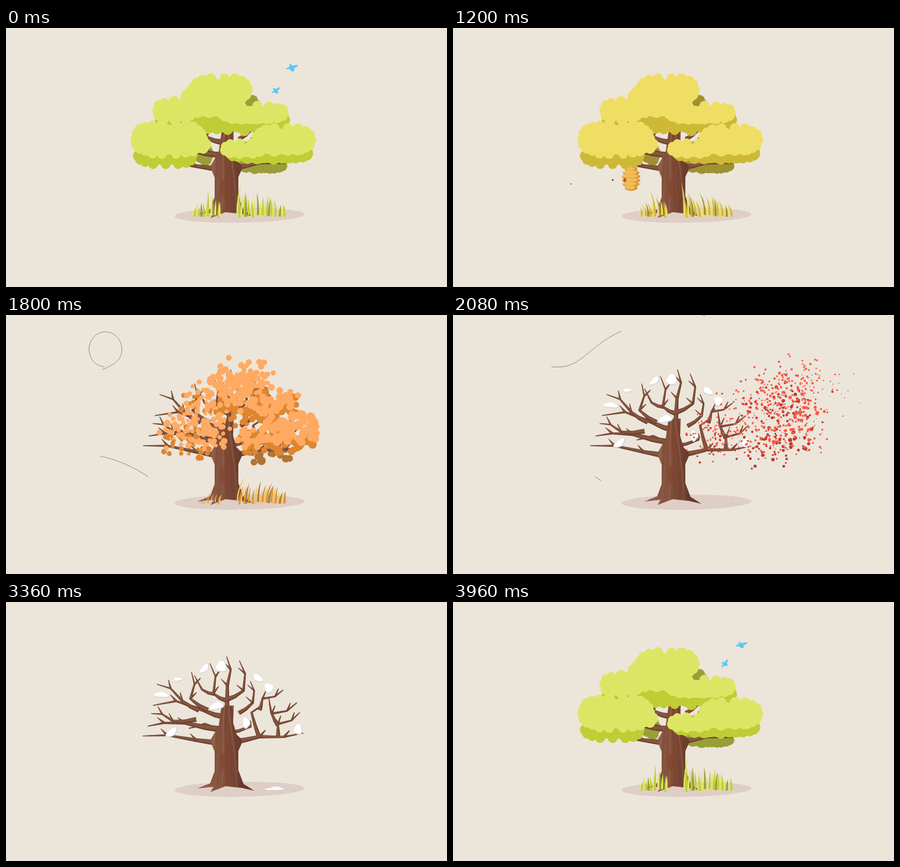
An HTML page with a canvas for the animation above (4000 ms loop, 765x450 px).

```html
<!DOCTYPE html>
<html lang="en">
<head>
<meta charset="utf-8">
<title>Tree through the seasons</title>
<style>
html, body { margin: 0; width: 100%; height: 100%; overflow: hidden; background: #ece5da; }
canvas { display: block; }
</style>
</head>
<body>
<canvas width="765" height="450"></canvas>
<script>
const LOOP = 4000, STEP = 40, TAU = Math.PI * 2;
const ctx = document.querySelector('canvas').getContext('2d');
const { sin, cos, hypot, abs, sqrt, max, min } = Math;

let seed = 11;
const rnd = () => (seed = (seed * 16807) % 2147483647) / 2147483647;
const mix = (a, b, k) => a + (b - a) * k;
const ramp = (t, from, to) => max(0, min(1, (t - from) / (to - from)));

// Ease out with a small overshoot
function pop(t, from, to) {
  const k = ramp(t, from, to) - 1;
  return 1 + 2.2 * k ** 3 + 1.2 * k ** 2;
}

function polygon(points, fill) {
  ctx.beginPath();
  points.forEach(p => ctx.lineTo(...p));
  ctx.fillStyle = fill;
  ctx.fill();
}

function oval(x, y, rx, ry, fill, turn = 0) {
  ctx.beginPath();
  ctx.ellipse(x, y, max(0, rx), max(0, ry), turn, 0, TAU);
  ctx.fillStyle = fill;
  ctx.fill();
}

function saved(draw) {
  ctx.save();
  draw();
  ctx.restore();
}

// ---- season colours: light, middle and back foliage
const seasons = ['dde664 bfcd36 9a9e37', 'efde64 cdb936 9f9032', 'ffaa63 dd8530 b27436', 'fb5847 c23a2e b53a2e']
  .map(s => s.split(' ').map(h => h.match(/../g).map(v => parseInt(v, 16))));

const seasonAt = t => t > 2800 ? 0 : ramp(t, 640, 1100) + ramp(t, 1380, 1720) + ramp(t, 1820, 2040);

function palette(season) {
  const i = min(2, Math.floor(season));
  return seasons[i].map((c, n) => `rgb(${c.map((v, j) => Math.round(mix(v, seasons[i + 1][n][j], season - i)))})`);
}

// ---- foliage: scalloped ovals packed with round leaves
const LIGHT = 0, MIDDLE = 1, BACK = 2;
const leaves = [];

function addLeaf(shade, x, y, r) {
  const size = 0.3 + 0.9 * sqrt(rnd());
  leaves.push({
    shade, x, y, r, size,
    start: 1480 + (x - 217) * 0.6 + rnd() * 70,
    speed: (0.75 + 0.35 * rnd() + 0.25 / size) * (1 + (150 - y) / 260),
    drift: (rnd() - 0.5) * 52,
    sprout: 3390 + hypot(x - 380, y - 190) * 0.8 + rnd() * 90
  });
}

function cluster(shade, cx, cy, rx, ry) {
  const n = Math.round((rx + ry) * 0.26);
  const soft = v => Math.sign(v) * abs(v) ** 0.8;
  for (let i = 0; i < n; i++) {
    const a = i / n * TAU;
    addLeaf(shade, cx + rx * soft(cos(a)), cy + ry * soft(sin(a)), 8 + rnd() * 2);
  }
  for (let y = cy - ry; y <= cy + ry; y += 7.5)
    for (let x = cx - rx; x <= cx + rx; x += 7.5)
      if (abs((x - cx) / rx) ** 2.5 + abs((y - cy) / ry) ** 2.5 < 1) addLeaf(shade, x + rnd() * 2, y + rnd() * 2, 8);
}

cluster(BACK, 415, 132, 18, 7);
cluster(BACK, 445, 240, 34, 4);
cluster(BACK, 344, 218, 9, 12);
cluster(MIDDLE, 405, 160, 78, 18);
cluster(MIDDLE, 278, 156, 13, 8);
cluster(LIGHT, 372, 107, 47, 20);
cluster(LIGHT, 292, 143, 30, 15);
cluster(LIGHT, 343, 127, 34, 20);
cluster(LIGHT, 428, 147, 54, 12);
cluster(MIDDLE, 277, 222, 47, 15);
cluster(LIGHT, 283, 193, 58, 26);
cluster(LIGHT, 326, 202, 21, 9);
cluster(MIDDLE, 456, 216, 68, 12);
cluster(LIGHT, 482, 194, 47, 20);
cluster(LIGHT, 412, 209, 32, 9);

function drawLeaves(t, colors, behind) {
  if (t > 2700 && t < 3380) return;
  for (const l of leaves) {
    if ((l.shade === BACK) !== behind) continue;
    let { x, y, r } = l;
    const e = t - l.start;
    if (t > 2800) r *= pop(t, l.sprout, l.sprout + 300);
    else if (e > 0) {
      x += 0.0007 * e * e * l.speed;
      y += l.drift * ramp(e, 0, 300);
      r *= mix(1, l.size, ramp(e, 100, 300)) / (1 + (e / 250) ** 2) * (1 - ramp(e, 600, 950));
    }
    if (r > 0.1) oval(x, y, r, r, colors[l.shade]);
  }
}

// ---- tree: every limb runs from the trunk over an elbow to its tip
function taper(points, w0, w1) {
  const n = points.length - 1;
  const side = (k, lift) => points.map((p, i) => {
    const a = points[max(0, i - 1)], b = points[min(n, i + 1)];
    const d = hypot(b[0] - a[0], b[1] - a[1]), w = mix(w0, w1, i / n) / 2 * k;
    return [p[0] - (b[1] - a[1]) / d * w - lift, p[1] + (b[0] - a[0]) / d * w - lift];
  });
  polygon([...side(1, 0), ...side(-1, 0).reverse()], '#6d3f2e');
  polygon([...side(0.6, 0.7), ...side(-0.6, 0.7).reverse()], '#855641');
}

function limb(ex, ey, tx, ty, rootX = 382, rootY = max(170, min(243, ey + 12))) {
  const dx = tx - ex, dy = ty - ey, length = hypot(dx, dy);
  const reach = hypot(ex - rootX, ey - rootY) + length;
  const bend = length > 30 ? (ty > 200 ? 0.05 : 0.13) : 0;
  const knee = [ex + dx * 0.55 - dy * bend, ey + dy * 0.55 + dx * bend];
  const width = 4 + reach * 0.055;
  taper([[rootX, rootY], [(rootX + ex) / 2, (rootY + ey) / 2 + 2], [ex, ey], knee, [tx, ty]], width, 1);
  // A twig leaves each bend on the outer side
  if (length > 36) {
    const turn = ex < 382 ? 0.75 : -0.75, reachOut = 15 / length;
    const along = [dx * cos(turn) - dy * sin(turn), dx * sin(turn) + dy * cos(turn)];
    for (const [x, y] of [knee, [ex, ey]]) taper([[x, y], [x + along[0] * reachOut, y + along[1] * reachOut]], width * 0.42, 1);
  }
}

function leftLimbs() {
  limb(330, 240, 237, 233);
  limb(345, 212, 317, 220);
  limb(310, 210, 246, 216);
  limb(290, 207, 252, 194, 330, 204);
  limb(342, 188, 255, 180);
  limb(306, 172, 262, 143, 335, 188);
  limb(320, 168, 322, 122, 350, 188);
}

function rightLimbs() {
  limb(384, 145, 383, 95, 383, 205);
  limb(360, 159, 354, 107);
  limb(340, 152, 327, 128, 362, 160);
  limb(412, 154, 405, 102);
  limb(428, 175, 424, 138, 404, 193);
  limb(425, 216, 424, 206);
  limb(426, 192, 444, 180, 438, 232);
  limb(445, 168, 481, 153, 440, 188);
  limb(472, 212, 510, 192, 472, 234);
  limb(461, 194, 505, 175, 472, 214);
  limb(460, 192, 456, 167, 472, 214);
  limb(440, 234, 516, 228);
}

const trunk = new Path2D('M332 324L354 315 362 294V260L354 241 369 215 374 180H395L394 210 400 230 411 241 403 259V292L412 316 431 328 409 323 381 320 355 330 360 321Z');

function drawTrunk() {
  const shade = ctx.createLinearGradient(358, 0, 412, 0);
  ['#8b5b46', '#7e4a36', '#65392a'].forEach((c, i) => shade.addColorStop(i / 2, c));
  ctx.fillStyle = shade;
  ctx.fill(trunk);
  ctx.clip(trunk);
  for (let i = 0; i < 11; i++) {
    const x = 352 + i * 6;
    ctx.beginPath();
    ctx.moveTo(x * 0.35 + 248, 180);
    ctx.bezierCurveTo(x - 4, 225, x + 6, 270, x * 1.5 - 191, 330);
    ctx.strokeStyle = i % 3 === 1 ? 'rgba(172,121,99,.35)' : 'rgba(88,44,29,.18)';
    ctx.lineWidth = 1 + i % 3;
    ctx.stroke();
  }
  oval(378, 278, 6, 15, 'rgba(133,65,43,.6)');
}

// ---- snow: centre, radii and turn of each heap
const heaps = [
  [270, 162, 22, 8, 0.05], [298, 135, 13, 5, 0], [345, 116, 18, 8, -0.7], [374, 113, 17, 16, 0], [437, 133, 17, 9, 0.5],
  [456, 150, 14, 14, 0.4], [366, 181, 20, 11, -0.3], [417, 210, 10, 17, -0.15], [288, 227, 20, 9, -0.6], [507, 222, 12, 15, 0]
];

function heap(rx, ry, i, fill) {
  const outline = [];
  for (let a = 0; a < TAU; a += 0.15) {
    const r = 1 + 0.13 * sin(3 * a + i * 2) + 0.06 * cos(2 * a + i);
    outline.push([rx * r * cos(a), ry * r * sin(a)]);
  }
  polygon(outline, fill);
}

function drawSnow(t, onLeft) {
  const size = ramp(t, 1960, 2520) ** 0.35 - 0.4 * ramp(t, 2840, 3360) - 0.6 * ramp(t, 3360, 3520);
  if (size <= 0) return;
  heaps.forEach(([x, y, rx, ry, turn], i) => {
    if ((x < 350) === onLeft) saved(() => {
      ctx.translate(x, y);
      ctx.scale(size, size);
      ctx.rotate(turn);
      heap(rx, ry, i, '#cbd4dc');
      ctx.translate(-1, -1.5);
      heap(rx * 0.92, ry * 0.9, i, '#fff');
    });
  });
}

function drawFlakes(t) {
  if (t < 2200 || t > 3300) return;
  for (const [x, start] of [[314, 64], [435, 32], [490, 119], [256, 152], [375, -50]]) {
    const y = start + (t - 2640) * 0.2, ground = 105 + abs(x - 375) * 0.45;
    if (y > ground) continue;
    oval(x, y, 4, 4.3, '#cbd4dc');
    oval(x - 0.8, y - 0.6, 2.8, 3.4, '#fff', 0.5);
  }
}

function ball(x, y, r) {
  oval(x, y, r, r, '#cbd4dc');
  ctx.save();
  ctx.clip();
  oval(x - r * 0.33, y - r * 0.25, r, r, '#fff');
  ctx.restore();
}

function drawSnowman(t) {
  if (t < 2240 || t > 3540) return;
  const grow = pop(t, 2240, 2540), melt = ramp(t, 2800, 3360), vanish = 1 - ramp(t, 3360, 3540);
  saved(() => {
    ctx.translate(467, 327);
    ctx.scale(grow * (1 - 0.15 * melt) * vanish, grow * mix(1, 0.09, sqrt(melt)) * vanish);
    ball(2.5, -22, 23);
    ball(2, -54, 14.5);
    oval(-8.5, -60, 1.3, 1.3, '#3b2a24');
    oval(-3, -60, 1.3, 1.3, '#3b2a24');
    polygon([[-20, -49], [-7, -55], [-4, -52], [-8, -49]], '#ff8b0f');
  });
}

// ---- grass
const blades = [];
function meadow(from, to, count, height) {
  for (let i = 0; i < count; i++) {
    const x = mix(from, to, (i + rnd() * 0.6) / count);
    blades.push({ x, y: 325 + rnd() * 5, h: height(x) * (0.6 + 0.4 * rnd()), tilt: (rnd() - 0.4) * 0.22, shade: i % 5 === 4 ? BACK : i % 2 });
  }
}
meadow(322, 374, 13, x => 48 - abs(x - 353) * 1.2);
meadow(400, 486, 22, x => 58 - (x - 400) * 0.42);

function drawGrass(t) {
  const colors = palette(min(1.65, seasonAt(t)));
  const lean = 0.45 * ramp(t, 1500, 1850) - 0.2 * ramp(t, 300, 1200) - 0.25 * ramp(t, 2800, 3400);
  for (const { x, y, h, tilt, shade } of blades) {
    const gone = 1560 + (x - 323) * 1.85;
    const size = t > 2800 ? pop(t, 3080 + x, 3360 + x) : sqrt(1 - ramp(t, gone, gone + 230));
    if (size <= 0) continue;
    const tall = h * size, w = 1.8 * size;
    ctx.beginPath();
    ctx.moveTo(x - w, y);
    ctx.quadraticCurveTo(x - w * 0.8, y - tall * 0.6, x + tall * (lean + tilt), y - tall);
    ctx.quadraticCurveTo(x + w * 1.3, y - tall * 0.55, x + w, y);
    ctx.fillStyle = colors[shade];
    ctx.fill();
  }
}

// ---- hive and bees
function drawHive(t) {
  const size = pop(t, 760, 1040) * (1 - ramp(t, 1400, 1620));
  if (size <= 0) return;
  saved(() => {
    ctx.translate(309, 240);
    ctx.scale(size, size);
    for (let i = 0; i < 6; i++) {
      const w = 16 * sqrt(1 - ((i - 2.5) / 3.5) ** 2), y = 5 + i * 6.6;
      oval(0, y, w, 4.8, '#dc9630');
      oval(-2, y - 0.9, w - 2.5, 3.5, '#f3bd58');
    }
    oval(-11, 24, 2.5, 3.3, '#a8641f');
  });
}

function drawBees(t) {
  if (t < 900 || t > 1680) return;
  [[277, 264, 1.2], [205, 271, 0.8]].forEach(([x, y, r]) => {
    const bx = x - (t - 1200) * 0.24;
    if (bx > 90 && bx < 296) oval(bx, y + 5 * sin((t - 1200) / 90), r * 1.4, r, '#33251f', 0.5);
  });
}

// ---- birds sweep out from behind the crown and back again
const birdBody = new Path2D('M-11 3Q-6 -3 0 -2Q5 -6 11 -4Q8 0 3 1L-5 2Z');

function bird(x, y, size, turn, flap) {
  saved(() => {
    ctx.translate(x, y);
    ctx.rotate(turn);
    ctx.scale(size, size);
    ctx.fillStyle = '#5bc8f8';
    ctx.fill(birdBody);
    ctx.scale(1, flap);
    ctx.fill(new Path2D('M-5 1Q-3 6 2 7Q5 6 4 0L3 0Q2 -6 -5 -6.5L-3 0Z'));
  });
}

function drawBirds(t) {
  const d = t < LOOP / 2 ? t : t - LOOP;
  if (d < -360 || d > 320) return;
  const flap = cos(d / 60), size = ramp(d, -360, -120);
  bird(496 - 0.14 * d - 0.0009 * d * d, 69 - 0.12 * d + 0.0006 * d * d, size, 0, flap);
  if (d > -300 && d < 220)
    bird(468 - 0.13 * d - 0.0009 * d * d, 109 + 0.06 * d + 0.0004 * d * d, size * 0.82, -0.3 + d / 130, 0.4 + 0.6 * flap);
}

// ---- wind: a stroke whose head and tail run along a path
function wind(d) {
  const path = document.createElementNS('http://www.w3.org/2000/svg', 'path');
  path.setAttribute('d', d);
  const length = path.getTotalLength(), line = new Path2D(d);
  return (tail, head) => saved(() => {
    if (head <= tail) return;
    ctx.setLineDash([(head - tail) * length, length * 2]);
    ctx.lineDashOffset = -tail * length;
    ctx.strokeStyle = '#95897b';
    ctx.stroke(line);
  });
}
const curl = wind('M88 118C125 112 150 103 167 95C188 86 201 78 201 60A28.5 30.5 0 1 0 175 90C222 95 232 55 292 28');
const breeze = wind('M88 240C150 238 200 247 257 288');
const gust = wind('M431 0C480 6 520 -8 576 5');

function drawWind(t) {
  curl(0.2 * ramp(t, 1720, 1800) + 0.46 * ramp(t, 1800, 2080) + 0.34 * ramp(t, 2080, 2220),
    0.66 * ramp(t, 1400, 1800) + 0.34 * ramp(t, 1800, 2080));
  breeze(0.42 * ramp(t, 1660, 1800) + 0.51 * ramp(t, 1800, 2080) + 0.07 * ramp(t, 2080, 2180),
    0.93 * ramp(t, 1480, 1800) + 0.07 * ramp(t, 1800, 2000));
  gust(ramp(t, 2240, 2670), ramp(t, 2060, 2480));
}

function drawTree(t) {
  const sway = 0.04 * (ramp(t, 1500, 1800) - ramp(t, 2100, 2500));
  const swayed = (onLeft, draw) => saved(() => {
    const lift = onLeft ? sway : 0;
    ctx.transform(1, lift, -sway, 1, sway * 260, -lift * 382);
    draw();
  });
  swayed(true, leftLimbs);
  swayed(false, rightLimbs);
  saved(drawTrunk);
  for (const onLeft of [true, false]) swayed(onLeft, () => drawSnow(t, onLeft));
}

function draw(t) {
  const colors = palette(seasonAt(t));
  ctx.fillStyle = '#ece5da';
  ctx.fillRect(0, 0, 765, 450);
  oval(405, 325.3, 112.5, 13, '#dfcec6', -0.015);
  drawWind(t);
  drawBirds(t);
  drawLeaves(t, colors, true);
  drawTree(t);
  drawHive(t);
  drawSnowman(t);
  drawGrass(t);
  drawLeaves(t, colors, false);
  drawFlakes(t);
  drawBees(t);
}

const begin = performance.now();
function tick() {
  const t = (performance.now() - begin) % LOOP;
  draw(Math.floor(t / STEP) * STEP);
  requestAnimationFrame(tick);
}
tick();
</script>
</body>
</html>
```
